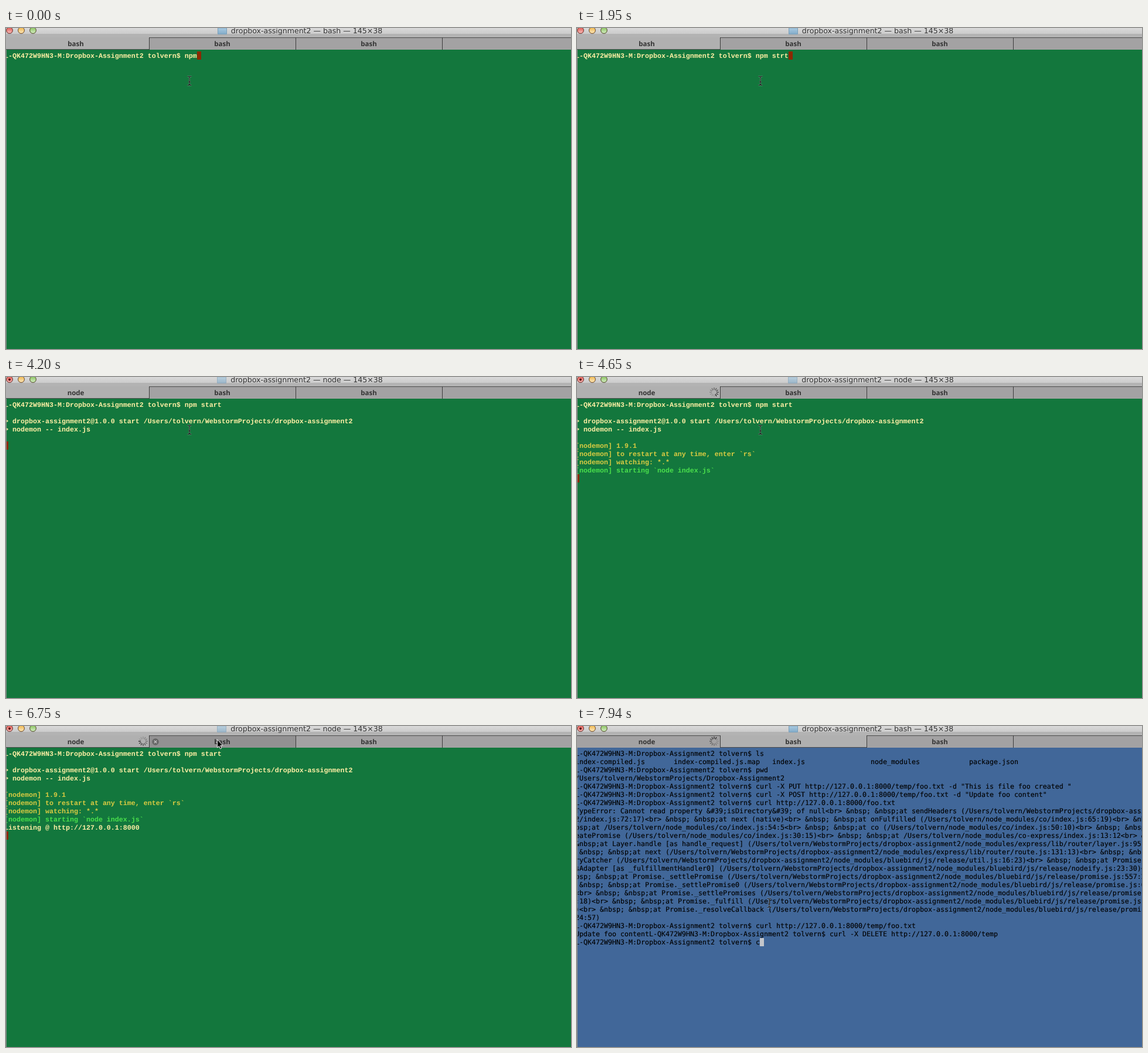
Recreate the animation shown at these times as an HTML page. Size 964 by 548 pixels, loop 8 s.

```html
<!DOCTYPE html>
<html lang="en">
<head>
<meta charset="utf-8">
<title>Terminal</title>
<style>
  html, body { margin: 0; width: 100%; height: 100%; overflow: hidden; }
  svg { display: block; width: 100%; height: 100%; }
  text { white-space: pre; text-rendering: geometricPrecision; }
  .title { font: 12.55px "DejaVu Sans", sans-serif; fill: #333; text-anchor: middle; }
  .label { font: 700 11.5px "Open Sans", sans-serif; fill: #333; text-anchor: middle; }
  #grass text { font: 700 11.667px "Liberation Mono", monospace; fill: #fff0a5; }
  #grass .warn { fill: #d9cb42; }
  #grass .good { fill: #4ae04c; }
  #ocean text { font: 11.63px "DejaVu Sans Mono", monospace; fill: #000; stroke: #000; stroke-width: .15px; }
</style>
</head>
<body>
<svg viewBox="0 0 964 548">
  <defs>
    <linearGradient id="bar" x2="0" y2="1"><stop stop-color="#d9d9d9"/><stop offset="1" stop-color="#cbcbcb"/></linearGradient>
    <linearGradient id="paper" x2="0" y2="1"><stop stop-color="#a9cbe2"/><stop offset="1" stop-color="#82abc8"/></linearGradient>
    <linearGradient id="shine" x2="0" y2="1"><stop stop-color="#fff" stop-opacity=".1"/><stop offset="1" stop-color="#fff" stop-opacity=".65"/></linearGradient>
  </defs>

  <rect width="964" height="38" fill="#b3b3b3"/>
  <rect width="964" height="10" fill="url(#bar)"/>
  <g id="lights"></g>
  <circle id="busy" cx="6" cy="4.5" r="2" fill="#5c0d0a"/>
  <path id="folder" d="M361.5 0H376.500V10.500H361.500Z" fill="url(#paper)" stroke="#7a9fba"/>
  <text id="title" class="title" x="513" y="9"></text>

  <rect y="16" width="964" height="21" fill="#a3a2a3"/>
  <path d="M0 16.500H964" stroke="#4c4c4c"/>
  <rect id="hover" x="245" y="17" width="249" height="20" fill="#929192"/>
  <rect id="active" y="16" height="21" fill="#b0b0b0"/>
  <rect id="under" y="36" height="1" fill="#4c4c4c"/>
  <path d="M244.500 16V37M494.500 16V37M744.500 16V37" stroke="#3c3c3c"/>
  <text id="tab1" class="label" x="119" y="31"></text>
  <text class="label" x="369" y="31">bash</text>
  <text class="label" x="619" y="31">bash</text>
  <g id="spinner" stroke="#2c2c2c" stroke-width="1.4"></g>
  <g id="close">
    <circle cx="255" cy="27" r="5.700" fill="#666"/>
    <path d="M252.700 24.700l4.600 4.600m0-4.600l-4.600 4.600" stroke="#c4c4c4" stroke-width="1.400"/>
  </g>

  <g id="grass">
    <rect y="37" width="964" height="511" fill="#13773d"/>
    <rect id="block" width="7" height="14" fill="#8c2800"/>
  </g>
  <g id="ocean">
    <rect y="37" width="964" height="511" fill="#416799"/>
    <rect id="oceanBlock" y="362" width="7" height="14" fill="#c3c6cb"/>
  </g>
  <rect y="37" width="1" height="511" fill="#8b8b8b"/>

  <g id="beam" fill="none">
    <path id="beamShape" d="M-3.500-7.500H-2Q0-7.500 0-5.500Q0-7.500 2-7.500H3.500M0-5.500V5.500M-2 2H2M-3.500 7.500H-2Q0 7.500 0 5.500Q0 7.500 2 7.500H3.500"/>
    <use href="#beamShape" stroke="#fff" stroke-opacity=".45" stroke-width="2.200"/>
    <use href="#beamShape" stroke="#111" stroke-width="1.100"/>
  </g>
  <path id="arrow" d="M0 0V14L3 11.200L5 16L7.300 15L5.300 10.300H9.300Z" fill="#000" stroke="#fff" stroke-width=".9"/>
</svg>

<script>
const $ = id => document.getElementById(id);
const LOOP = 8000, RUN = 3900, SPIN = 4350, SWITCH = 6890;
const CELL = 7, LINE = 14, LEFT = -3, TOP = 40;

function add(parent, tag, attrs, text = '') {
  const node = document.createElementNS('http://www.w3.org/2000/svg', tag);
  for (const key in attrs) node.setAttribute(key, attrs[key]);
  node.textContent = text;
  return parent.appendChild(node);
}
const set = (id, attrs) => Object.entries(attrs).forEach(([k, v]) => $(id).setAttribute(k, v));
const show = (node, on) => node.setAttribute('visibility', on ? 'visible' : 'hidden');
const latest = (steps, t) => steps.findLast(step => step[0] <= t);
const print = (screen, row, text, cls = '') =>
  add($(screen), 'text', { x: LEFT, y: TOP + 11 + row * LINE, class: cls }, text);

// Window buttons
['#df4840', '#efb23c', '#7fbf4f'].forEach((color, i) => {
  const ball = { cx: 6 + 20 * i, cy: 4, r: 5.5 };
  add($('lights'), 'circle', { ...ball, fill: color, stroke: '#6b5650' });
  add($('lights'), 'circle', { ...ball, r: 4.5, fill: 'url(#shine)' });
});

const spokes = Array.from({ length: 12 }, (_, i) =>
  add($('spinner'), 'path', { d: 'M0-4V-8', transform: `translate(234 26) rotate(${i * 30})` }));

// First shell
const home = '/Users/tolvern';
const prompt = 'L-QK472W9HN3-M:Dropbox-Assignment2 tolvern$ ';
const command = print('grass', 0, '');
const output = [
  [4200, 2, `> dropbox-assignment2@1.0.0 start ${home}/WebstormProjects/dropbox-assignment2`],
  [4200, 3, '> nodemon -- index.js'],
  [4650, 5, '[nodemon] 1.9.1', 'warn'],
  [4650, 6, '[nodemon] to restart at any time, enter `rs`', 'warn'],
  [4650, 7, '[nodemon] watching: *.*', 'warn'],
  [4650, 8, '[nodemon] starting `node index.js`', 'good'],
  [4950, 9, 'Listening @ http://127.0.0.1:8000']
].map(([time, ...line]) => ({ time, node: print('grass', ...line) }));

const typing = [
  [0, 'npm'], [150, 'npm '], [300, 'npm s'], [600, 'npm st'], [900, 'npm strt'],
  [1050, 'npm strta'], [1950, 'npm strt'], [2100, 'npm str'], [2250, 'npm st'],
  [2700, 'npm sta'], [3000, 'npm star'], [3150, 'npm start']
];
const blockRows = [[0, 0], [RUN, 1], [4200, 5], [4650, 9], [4950, 10]];

// Second shell
const project = home + '/WebstormProjects/dropbox-assignment2';
const modules = project + '/node_modules';
const co = home + '/node_modules/co';
const release = modules + '/bluebird/js/release';
const server = 'http://127.0.0.1:8000';
const trace = [
  'TypeError: Cannot read property &#39;isDirectory&#39; of null',
  `sendHeaders (${project}/index.js:72:17)`,
  'next (native)',
  `onFulfilled (${co}/index.js:65:19)`,
  `${co}/index.js:54:5`,
  `co (${co}/index.js:50:10)`,
  `createPromise (${co}/index.js:30:15)`,
  `${co}-express/index.js:13:12`,
  `Layer.handle [as handle_request] (${modules}/express/lib/router/layer.js:95:5)`,
  `next (${modules}/express/lib/router/route.js:131:13)`,
  `tryCatcher (${release}/util.js:16:23)`,
  `Promise.successAdapter [as _fulfillmentHandler0] (${release}/nodeify.js:23:30)`,
  `Promise._settlePromise (${release}/promise.js:557:21)`,
  `Promise._settlePromise0 (${release}/promise.js:605:10)`,
  `Promise._settlePromises (${release}/promise.js:693:18)`,
  `Promise._fulfill (${release}/promise.js:638:18)`,
  `Promise._resolveCallback (${release}/promise.js:424:57)`
].join('<br> &nbsp; &nbsp;at ');
const files = ['index-compiled.js', 'index-compiled.js.map', 'index.js', 'node_modules', 'package.json'];

const history = [
  prompt + 'ls',
  files.map(name => name.padEnd(24)).join(''),
  prompt + 'pwd',
  home + '/WebstormProjects/Dropbox-Assignment2',
  prompt + `curl -X PUT ${server}/temp/foo.txt -d "This is file foo created "`,
  prompt + `curl -X POST ${server}/temp/foo.txt -d "Update foo content"`,
  prompt + `curl ${server}/foo.txt`,
  ...trace.match(/.{1,145}/g),
  prompt + `curl ${server}/temp/foo.txt`,
  'Update foo content' + prompt + `curl -X DELETE ${server}/temp`
];
history.forEach((line, row) => print('ocean', row, line));
const nextCommand = print('ocean', history.length, prompt);

const pointer = [
  [0, 313, 90], [5100, 360, 98], [5250, 414, 104], [5700, 406, 88], [5850, 384, 56],
  [6000, 365, 27], [6150, 360.5, 23], [7190, 348, 140], [7340, 327, 285], [7490, 328, 302]
];

function draw(t) {
  const second = t >= SWITCH, running = t >= RUN;
  const tick = Math.floor((t + (second ? 10 : 0)) / 150);

  $('title').textContent = `dropbox-assignment2 — ${running && !second ? 'node' : 'bash'} — 145×38`;
  $('tab1').textContent = running ? 'node' : 'bash';
  set('folder', running && !second ? { transform: 'translate(-1 0)', opacity: .65 } : { transform: '', opacity: 1 });
  show($('busy'), running);
  const tab = second ? { x: 245, width: 249 } : { x: 0, width: 244 };
  set('active', tab);
  set('under', tab);

  show($('spinner'), t >= SPIN);
  const head = 3 + (tick - 36) * 2;
  spokes.forEach((spoke, i) => {
    const age = (((head - i) % 12) + 12) % 12;
    spoke.setAttribute('opacity', Math.max(.2, 1 - age * .085));
  });

  show($('grass'), !second);
  show($('ocean'), second);
  const typed = latest(typing, t)[1];
  const row = latest(blockRows, t)[1];
  command.textContent = prompt + typed;
  set('block', {
    x: LEFT + CELL * (row ? 0 : prompt.length + typed.length),
    y: TOP + LINE * row
  });
  output.forEach(line => show(line.node, !second && t >= line.time));

  const letter = t >= 7940 ? 'c' : '';
  nextCommand.textContent = prompt + letter;
  set('oceanBlock', { x: LEFT + CELL * (prompt.length + letter.length) });

  const [, x, y] = latest(pointer, t);
  const onTab = y < 38;
  show($('close'), onTab);
  show($('hover'), onTab && !second);
  show($('arrow'), onTab);
  show($('beam'), !onTab);
  set(onTab ? 'arrow' : 'beam', { transform: `translate(${x} ${y})` });
}

const start = performance.now();
function loop() {
  draw((performance.now() - start) % LOOP);
  requestAnimationFrame(loop);
}
loop();
</script>
</body>
</html>
```
